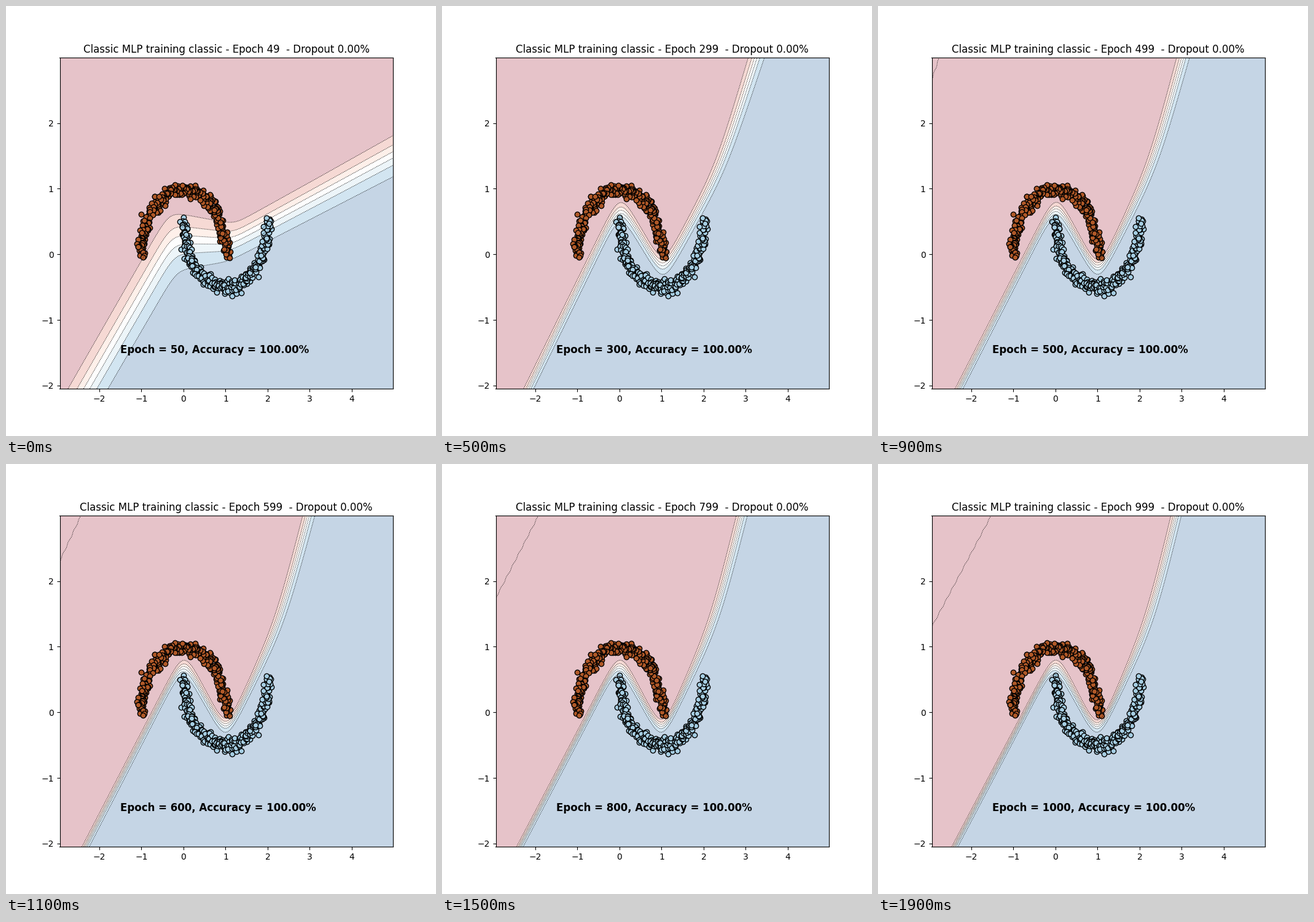
Write a matplotlib script that moves like this. It is 700 px wide and 700 px high and loops after 2 s.

```python
import numpy as np
import matplotlib.pyplot as plt
from matplotlib.animation import FuncAnimation

FRAMES, STEP_MS, EPOCH_STEP = 20, 100, 50
XLIM, YLIM = (-2.94, 4.98), (-2.047, 2.998)
LEVELS = np.arange(1, 7) * 0.15

# Corners of the lowest and highest contour at three epochs, in stage pixels:
# start, peak, trough, upper bend, end.
EARLY = np.array([
    [(101, 623), (266, 335), (372, 355), (500, 284), (630, 211)],
    [(166, 623), (278, 430), (362, 416), (500, 345), (630, 278)]], float)
MIDDLE = np.array([
    [(142, 623), (291, 303), (360, 414), (453, 265), (514, 84)],
    [(163, 623), (292, 342), (362, 452), (470, 277), (547, 84)]], float)
LATE = np.array([
    [(120, 623), (290, 301), (358, 437), (437, 252), (477, 84)],
    [(130, 623), (287, 325), (357, 455), (452, 258), (494, 84)]], float)
ROUNDING = (6.8, 6.8, 12)


def to_data(x, y):
    return (XLIM[0] + (x - 87.5) / 542.5 * (XLIM[1] - XLIM[0]),
            YLIM[0] + (623 - y) / 539 * (YLIM[1] - YLIM[0]))


def corners(epoch):
    """Training slows down, so the shape moves linearly in 1 / epoch."""
    if epoch < 200:
        a, b, e0, e1 = EARLY, MIDDLE, 50, 200
    else:
        a, b, e0, e1 = MIDDLE, LATE, 200, 1000
    f = (1 / e0 - 1 / epoch) / (1 / e0 - 1 / e1)
    return a + f * (b - a)


def rounded(points, x):
    """Polyline through points with softplus corners and straight ends."""
    dx, dy = np.diff(points, axis=0).T
    slope = dy / dx
    y = points[0, 1] + slope[0] * (x - points[0, 0])
    for (knot, _), turn, r in zip(points[1:], np.diff(slope), ROUNDING):
        y += turn * r * np.logaddexp(0, (x - knot) / r)
    return y


def saturation_line(epoch):
    """Slightly ragged corner line where the output reaches exactly zero."""
    g = np.log(epoch / 600)
    u = np.linspace(0, 1, 80)
    x = 122 + 122 * g + u * (-34.5 - 122 * g)
    y = 84 + u * (74 + 210 * g)
    return to_data(x + 0.7 * np.sin(y / 3), y)


def moons(n=400, noise=0.05):
    rng = np.random.RandomState(0)
    t = np.linspace(0, np.pi, n)
    arcs = np.array([[np.cos(t), np.sin(t)], [1 - np.cos(t), 0.5 - np.sin(t)]])
    return arcs + rng.normal(scale=noise, size=arcs.shape)


fig, ax = plt.subplots(figsize=(7, 7), dpi=100)
bands = plt.get_cmap("RdBu")((np.arange(7) + 0.5) / 7)[:, :3] * 0.25 + 0.75
ax.set_facecolor(bands[0])
fills = [ax.fill([0, 1, 1], [0, 0, 1], color=c, lw=0, zorder=0.5)[0]
         for c in bands[1:]]
dotted = dict(color="k", ls=":", lw=0.7, zorder=2)
lines = [ax.plot([], [], **dotted)[0] for _ in LEVELS]
corner, = ax.plot([], [], **dotted)

for (x, y), shade in zip(moons(), ("#b15928", "#a6cee3")):
    ax.scatter(x, y, c=shade, edgecolors="k", s=36, zorder=1)

title = ax.set_title("")
label = ax.text(-1.5, -1.5, "", fontsize=12, fontweight="bold", zorder=3)
ax.set_xticks(range(-2, 5))
ax.set_yticks(range(-2, 3))
ax.set_xlim(*XLIM)
ax.set_ylim(*YLIM)

logit = np.log(LEVELS / (1 - LEVELS))
mixes = (logit - logit[0]) / (logit[-1] - logit[0])
grid = np.linspace(60, 720, 661)


def update(i):
    epoch = EPOCH_STEP * (i + 1)
    low, high = corners(epoch)
    for m, fill, line in zip(mixes, fills, lines):
        x, y = to_data(grid, rounded(low + m * (high - low), grid))
        line.set_data(x, y)
        fill.set_xy(np.column_stack([np.r_[x, x[-1], x[0]], np.r_[y, -20, -20]]))
    corner.set_data(*saturation_line(epoch))
    corner.set_visible(epoch >= 500)
    title.set_text(f"Classic MLP training classic - Epoch {epoch - 1}  - Dropout 0.00%")
    label.set_text(f"Epoch = {epoch}, Accuracy = 100.00%")
    return [*fills, *lines, corner, title, label]


anim = FuncAnimation(fig, update, frames=FRAMES, interval=STEP_MS,
                     init_func=lambda: update(0), repeat=True, blit=False)
plt.show()
```
